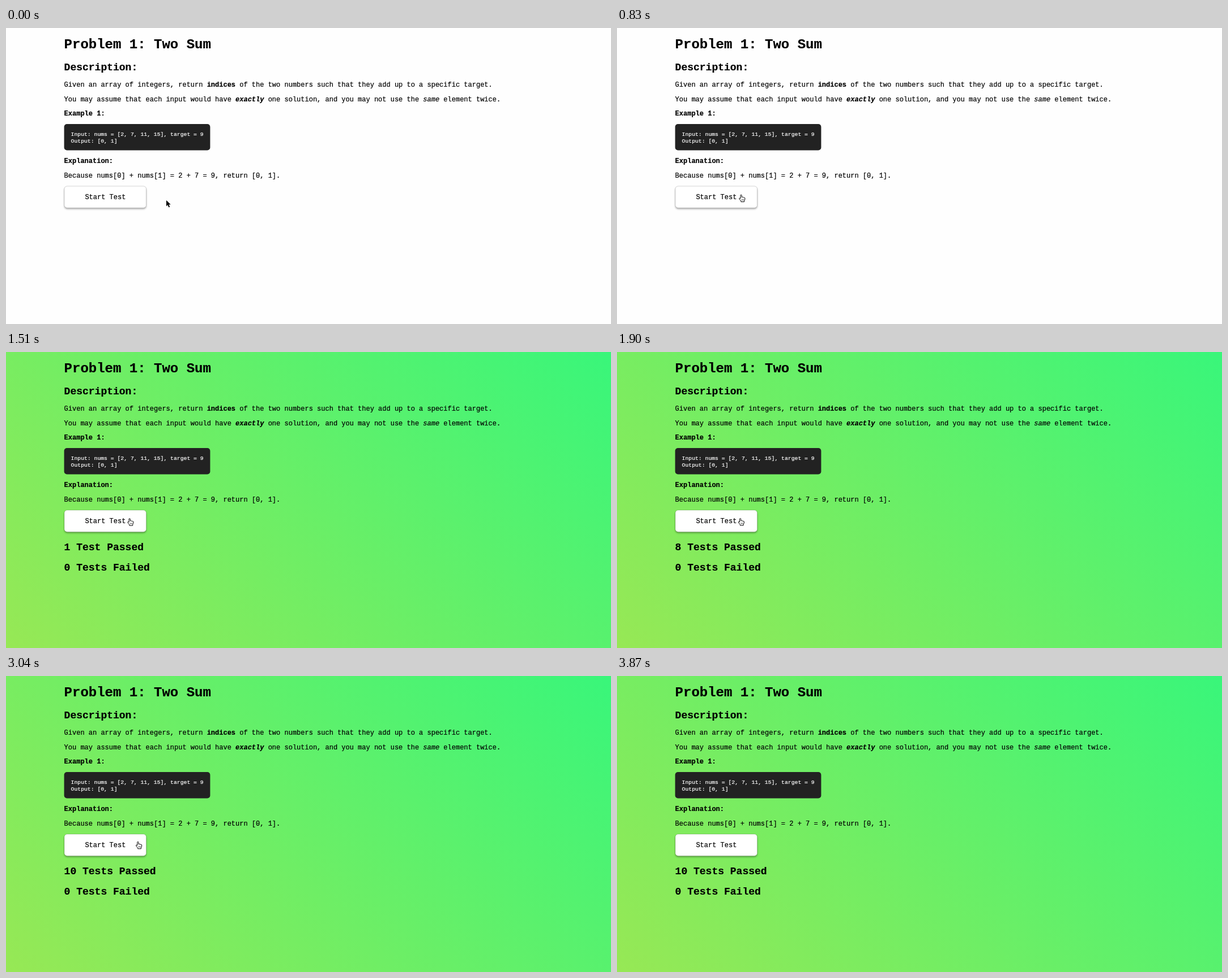
Write an HTML page that moves like this. It is 1068 by 524 pixels and loops after 4190 ms.

```html
<!DOCTYPE html>
<html lang="en">
<head>
<meta charset="utf-8">
<title>Two Sum</title>
<style>
  html, body { margin: 0; width: 100%; height: 100%; overflow: hidden; }
  body { background: #fefefe; }
  body.passed { background: linear-gradient(45deg, #97e855, #39f67a); }
  svg { display: block; width: 1068px; height: 524px; }
  text { font: 12px "Liberation Mono", "Courier New", monospace; white-space: pre; stroke: #000; stroke-width: .2px; }
  .h1 { font-size: 24px; font-weight: bold; }
  .h2 { font-size: 18px; font-weight: bold; }
  .code { font-size: 9.75px; fill: #fff; stroke: #fff; }
  .b { font-weight: bold; }
  .i { font-style: italic; }
  #button { filter: drop-shadow(0 2px 1.5px #0005); }
</style>
</head>
<body>
<svg viewBox="0 0 1068 524">
  <text class="h1" x="102.6" y="36">Problem 1: Two Sum</text>
  <text class="h2" x="102.6" y="75">Description:</text>
  <text x="102.6" y="104.4">Given an array of integers, return <tspan class="b">indices</tspan> of the two numbers such that they add up to a specific target.</text>
  <text x="102.6" y="129.9">You may assume that each input would have <tspan class="b i">exactly</tspan> one solution, and you may not use the <tspan class="i">same</tspan> element twice.</text>
  <text class="b" x="102.6" y="155.4">Example 1:</text>
  <rect x="102.6" y="170" width="257.8" height="46.5" rx="5" fill="#222"/>
  <text class="code" x="114.6" y="191.3">Input: nums = [2, 7, 11, 15], target = 9</text>
  <text class="code" x="114.6" y="202.6">Output: [0, 1]</text>
  <text class="b" x="102.6" y="239.4">Explanation:</text>
  <text x="102.6" y="264.9">Because nums[0] + nums[1] = 2 + 7 = 9, return [0, 1].</text>

  <rect id="button" x="103" y="280" width="144.5" height="38.4" rx="5" fill="#fff" stroke="#0003" stroke-width=".8"/>
  <path id="pressed" d="M103 315V285Q103 280 108 280H244" fill="none" stroke="#777"/>
  <text x="139.4" y="303.2">Start Test</text>

  <g id="results">
    <text id="count" class="h2" x="102.6" y="350.7"></text>
    <text class="h2" x="102.6" y="386.7">0 Tests Failed</text>
  </g>

  <g id="cursor" stroke-linejoin="round">
    <path id="arrow" d="M0 0V10.6L2.5 8.3L4.3 12.6L6.2 11.8L4.4 7.6H7.7Z" stroke="#fff" stroke-width="1.2" paint-order="stroke"/>
    <g id="hand" fill="#fff" stroke="#000">
      <path d="M-1.2 7V1.4Q-1.2 .4 -.2 .4T1 1.4V4.6Q2.2 3.7 3 5Q4.3 4.2 5 5.5Q6.7 5 6.7 6.8Q6.7 9.4 5.4 11V12.8H-.4V11.4L-3.1 8Q-3.9 6.7 -3 6.2Q-2.2 5.9 -1.2 7Z"/>
      <path d="M1.1 8.2V10.5M2.7 8.2V10.5M4.3 8.2V10.5" fill="none" stroke-width=".6"/>
    </g>
  </g>
</svg>
<script>
  const LOOP = 4190, PRESS = 1390, RELEASE = 1510, DONE = 2020, TESTS = 10;

  // Pointer stops, joined by eased moves
  const stops = [
    { t: 0, x: 283, y: 305 },
    { t: 410, x: 219.5, y: 295 },
    { t: 2320, x: 217.5, y: 294 },
    { t: 2950, x: 217.5, y: 294 },
    { t: 3040, x: 233, y: 293 },
    { t: 3460, x: 974, y: 446 },
    { t: 3870, x: 1080, y: 540 },
    { t: LOOP, x: 1080, y: 540 }
  ];

  const el = id => document.getElementById(id);
  const show = (id, on) => el(id).style.display = on ? "" : "none";
  const clamp = v => Math.min(1, Math.max(0, v));
  const ease = p => p * p * (3 - 2 * p);

  function pointer(t) {
    const next = stops.findIndex(s => s.t > t);
    const a = stops[next - 1], b = stops[next];
    const p = ease((t - a.t) / (b.t - a.t));
    return [a.x + (b.x - a.x) * p, a.y + (b.y - a.y) * p];
  }

  function draw(t) {
    const [x, y] = pointer(t);
    const overButton = x > 103 && x < 248 && y > 280 && y < 319;
    el("cursor").setAttribute("transform", `translate(${x} ${y})`);
    show("hand", overButton);
    show("arrow", !overButton);
    show("pressed", t >= PRESS && t < RELEASE);

    const passed = t >= RELEASE;
    const n = 1 + Math.round((TESTS - 1) * clamp((t - RELEASE) / (DONE - RELEASE)));
    document.body.classList.toggle("passed", passed);
    show("results", passed);
    el("count").textContent = `${n} Test${n > 1 ? "s" : ""} Passed`;
  }

  function frame() {
    draw(performance.now() % LOOP);
    requestAnimationFrame(frame);
  }
  frame();
</script>
</body>
</html>
```
